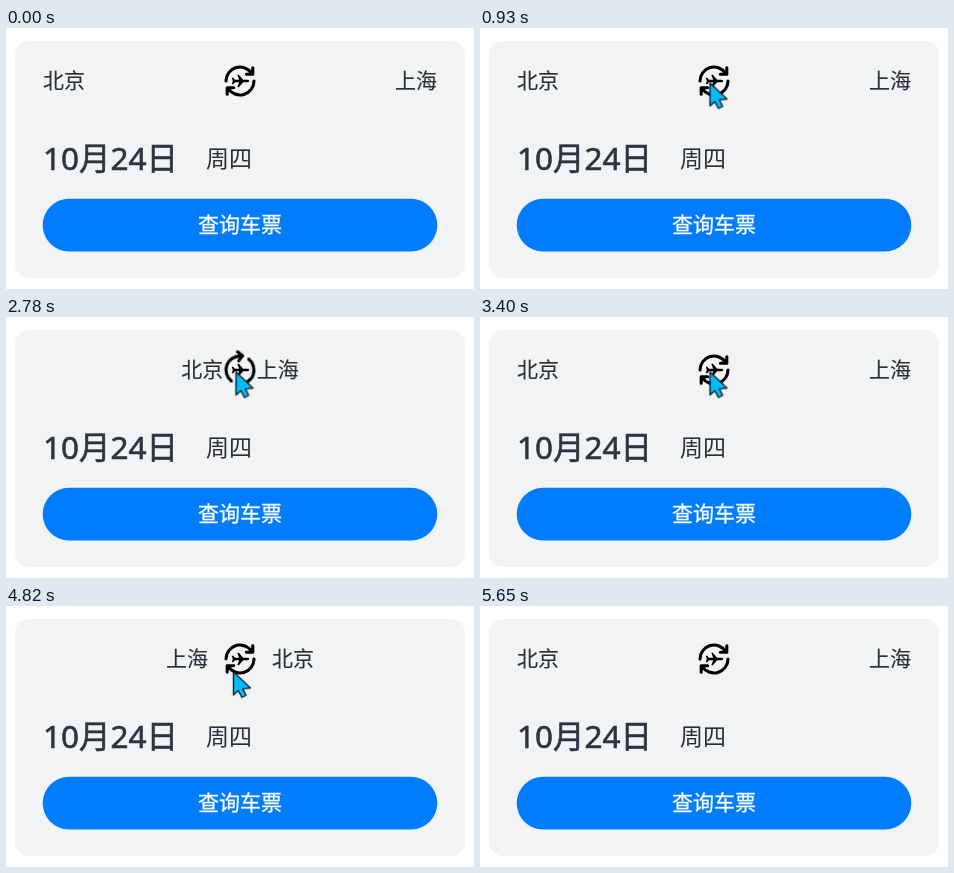
These frames come from a looping animation (468 by 261 pixels, 6.27 s). An HTML page:

```html
<!DOCTYPE html>
<html lang="zh-CN">
<head>
<meta charset="utf-8">
<title>查询车票</title>
<style>
  html, body { margin: 0; width: 100%; height: 100%; overflow: hidden; background: #fff; }
  svg { display: block; width: 468px; height: 261px; }
  text { font-family: "Noto Sans CJK SC", "Noto Sans CJK", "Noto Sans", sans-serif; fill: #27303c; }
  .city { font-size: 21px; stroke: #27303c; stroke-width: .15px; }
  .date { font: 500 31.5px "Noto Sans", "Noto Sans CJK SC", sans-serif; fill: #2b3440; stroke: #2b3440; stroke-width: .6px; }
  .day { font-size: 23px; }
  .label { font-size: 21px; font-weight: 500; fill: #fff; stroke: #fff; stroke-width: .3px; text-anchor: middle; }
  .ring { fill: none; stroke: #000; stroke-width: 3.1; stroke-linecap: round; stroke-linejoin: round; }
  .pointer { fill: #00bdf8; stroke: #0a1218; stroke-width: 1.3; stroke-linejoin: round; }
</style>
</head>
<body>
<svg viewBox="0 0 468 261">
  <defs>
    <path id="arrow" class="ring" d="M-14 0A14 14 0 0 1 11.8 -7.5M12.8 -13.2V-6.8H6.4"/>
    <path id="wing" d="M9.3 0Q9 -1.2 7 -1.2H3.2L-1.2 -6.3H-2.7L-.8 -1.2H-5L-6.9 -3.3H-8.2L-7.2 0Z"/>
  </defs>

  <rect x="9" y="13" width="450" height="237" rx="14" fill="#f1f3f5"/>
  <text class="date" x="37" y="142.3">10月24日</text>
  <text class="day" x="200" y="139.3">周四</text>
  <rect x="36.7" y="170.8" width="394.6" height="52.6" rx="26.3" fill="#007dff"/>
  <text class="label" x="234" y="203.8">查询车票</text>

  <g id="from"><text class="city" y="60">北京</text></g>
  <g id="to"><text class="city" y="60">上海</text></g>

  <g transform="translate(234 53)">
    <g id="ring">
      <use href="#arrow"/>
      <use href="#arrow" transform="rotate(180)"/>
    </g>
    <use href="#wing"/>
    <use href="#wing" transform="scale(1 -1)"/>
  </g>

  <g id="cursor">
    <path class="pointer" d="M.5 .5V23.5L5.3 19.3L9 26L13.2 23.7L9.8 17.3L17.6 16.6Z"/>
  </g>
</svg>
<script>
  const LOOP = 6270, LEFT = 37, RIGHT = 389;
  const SLIDE = 650, SPIN_DELAY = 150, SPIN = 750;
  const clicks = [1352, 2501, 3632, 4672];

  const move = (x, y = 0) => `translate(${x}px, ${y}px)`;
  const turn = deg => `rotate(${deg}deg)`;

  // Each stop: time in ms, transform, easing to the next stop
  function play(id, stops) {
    const first = stops[0], last = stops[stops.length - 1];
    const frames = [[0, first[1]], ...stops, [LOOP, last[1]]].map(
      ([ms, transform, easing = 'linear']) => ({ offset: ms / LOOP, transform, easing }));
    document.getElementById(id).animate(frames, { duration: LOOP, iterations: Infinity });
  }

  function slide(id, here, there) {
    play(id, clicks.flatMap((ms, i) => {
      const [a, b] = i % 2 ? [there, here] : [here, there];
      return [[ms, move(a), 'ease-out'], [ms + SLIDE, move(b)]];
    }));
  }

  slide('from', LEFT, RIGHT);
  slide('to', RIGHT, LEFT);

  // Half a turn per click, quick at first and slow to settle
  play('ring', clicks.flatMap((ms, i) => [
    [ms + SPIN_DELAY, turn(180 * i), 'cubic-bezier(.1, .8, .2, 1)'],
    [ms + SPIN_DELAY + SPIN, turn(180 * (i + 1))]
  ]));

  play('cursor', [
    [150, move(-22, 209), 'ease-in-out'],
    [790, move(238, 56)],
    [850, move(238, 56)],
    [920, move(229.5, 54.5)],
    [4669, move(229.5, 54.5), 'ease-in'],
    [4820, move(227, 65)],
    [5320, move(173, 264)]
  ]);
</script>
</body>
</html>
```
